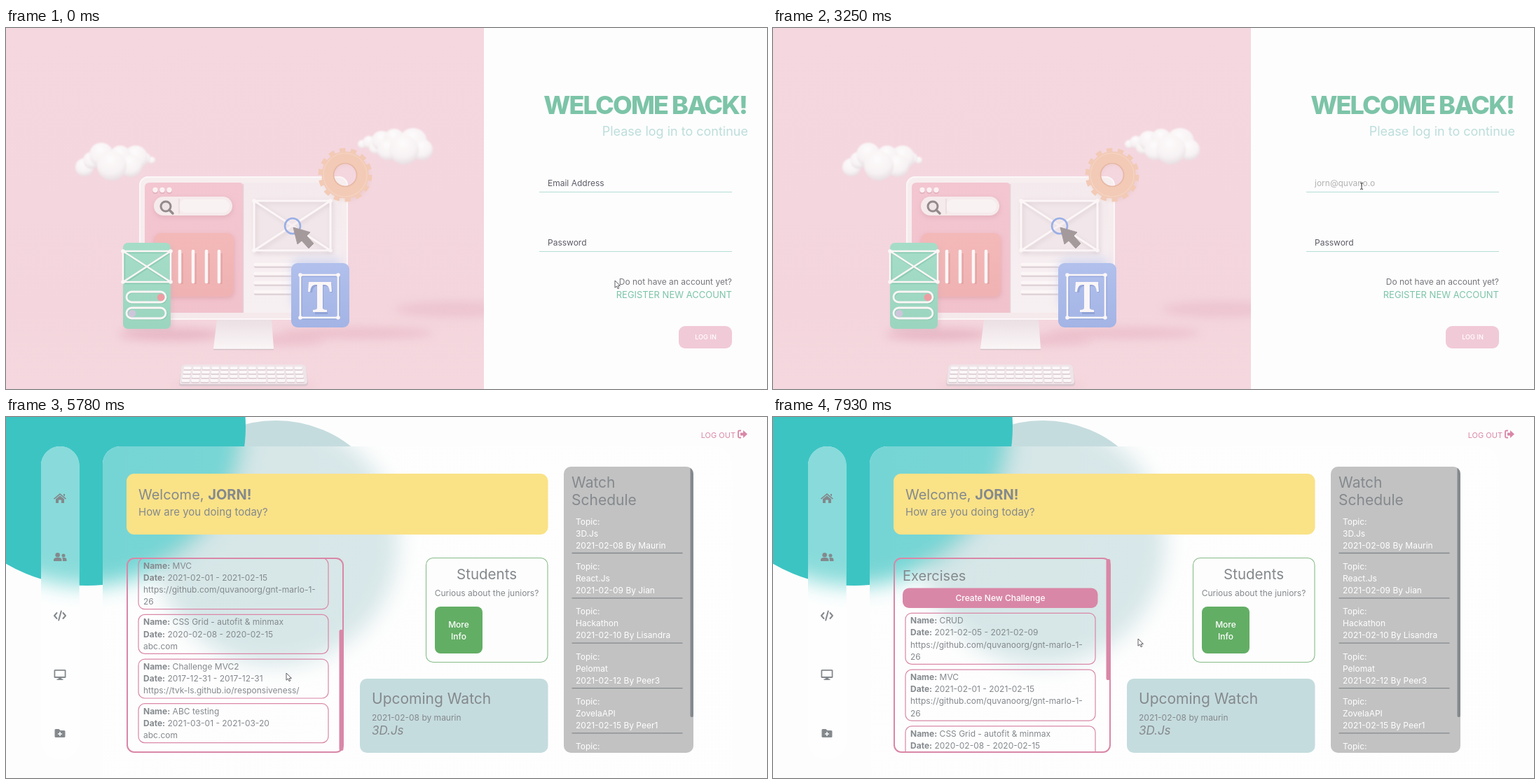
An HTML page that plays this animation: 1086 px wide and 516 px high, repeating every 8000 ms.

```html
<!DOCTYPE html>
<html lang="en">
<head>
<meta charset="utf-8">
<title>Log in and dashboard</title>
<style>
html, body { margin: 0; width: 100%; height: 100%; overflow: hidden; background: #fdfdfd; }
svg { display: block; width: 100%; height: 100%; }
text { font: 12px Inter, "Open Sans", sans-serif; fill: #84898d; white-space: pre; }
.b { font-weight: 700; }
.h { font-weight: 800; letter-spacing: -.052em; }
.m { font-weight: 500; }
.mid { text-anchor: middle; }
.end { text-anchor: end; }
.white { fill: #fff; }
.wire { fill: none; stroke: #fcf6f7; stroke-linecap: round; stroke-linejoin: round; }
</style>
</head>
<body>
<svg id="stage" viewBox="0 0 1086 516" xmlns="http://www.w3.org/2000/svg"></svg>
<script>
const PINK = '#d987a7', GREY = '#84898d', GREEN = '#7cc4a8', MINT = '#b5ddd6';

const rect = (x, y, x2, y2, r, fill, more = '') =>
  `<rect x="${x}" y="${y}" width="${x2 - x}" height="${y2 - y}" rx="${r}" fill="${fill}" ${more}/>`;
const circle = (x, y, r, fill, more = '') =>
  `<circle cx="${x}" cy="${y}" r="${r}" fill="${fill}" ${more}/>`;
const path = (d, fill, more = '') => `<path d="${d}" fill="${fill}" ${more}/>`;
const wire = (d, w) => `<path class="wire" d="${d}" stroke-width="${w}"/>`;
const text = (x, y, s, size = 12, cls = '', more = '') =>
  `<text x="${x}" y="${y}" class="${cls}" style="font-size:${size}px;${more}">${s}</text>`;
const bold = s => `<tspan class="b">${s}</tspan>`;
const grad = (id, a, b, dir = 'x2="0" y2="1"') =>
  `<linearGradient id="${id}" ${dir}><stop stop-color="${a}"/><stop offset="1" stop-color="${b}"/></linearGradient>`;

const defs = `<defs>
  <linearGradient id="wall" x2="0" y2="1">
    <stop stop-color="#f5d7e0"/><stop offset=".5" stop-color="#f4d6df"/>
    <stop offset=".78" stop-color="#f4d5dd"/><stop offset="1" stop-color="#f5d8df"/>
  </linearGradient>
  <radialGradient id="puff" cx=".45" cy=".28" r=".8">
    <stop stop-color="#fdfbfb"/><stop offset=".6" stop-color="#f7f2f3"/><stop offset="1" stop-color="#e2d8db"/>
  </radialGradient>
  ${grad('frame', '#f7eef0', '#f5e9ec')}
  ${grad('screen', '#f4eaed', '#f7f0f2')}
  ${grad('side', '#f3c6d1', '#f1c2cc')}
  ${grad('card', '#f3b9b8', '#f0b2b3')}
  ${grad('green', '#a5ddc8', '#9bd5bf')}
  ${grad('blue', '#b1c0ec', '#a3b4e5')}
  ${grad('stand', '#ebe0e4', '#fbf6f7')}
  ${grad('glass', '#ffffff46', '#ffffff62', '')}
  <filter id="soft" x="-30%" y="-120%" width="160%" height="340%"><feGaussianBlur stdDeviation="7"/></filter>
  <filter id="near" x="-20%" y="-20%" width="140%" height="140%"><feGaussianBlur stdDeviation="3"/></filter>
  <filter id="haze" x="-5%" y="-5%" width="110%" height="110%"><feGaussianBlur stdDeviation=".8"/></filter>
  <filter id="frost" x="-20%" y="-20%" width="140%" height="140%"><feGaussianBlur stdDeviation="15"/></filter>
  <clipPath id="art">${rect(0, 0, 682, 516, 0, '#000')}</clipPath>
  <clipPath id="panel">${rect(138, 42, 1036, 540, 25, '#000')}</clipPath>
  <clipPath id="bar">${rect(50, 42, 104.5, 490, 27, '#000')}</clipPath>
  <clipPath id="list">${rect(174, 203, 480, 478, 9, '#000')}</clipPath>
  <clipPath id="plan">${rect(796, 71, 981, 480, 10, '#000')}</clipPath>
</defs>`;

const cloud = puffs => `<g filter="url(#haze)">` +
  puffs.map(([x, y, r]) => circle(x, y, r, 'url(#puff)')).join('') + '</g>';

function gear() {
  const c = '#f2cab6';
  return circle(486, 214, 26, 'none', 'stroke="#dfb5a6" stroke-width="14" opacity=".3" filter="url(#near)"') +
    circle(484, 210, 34, 'none', `stroke="${c}" stroke-width="9" pathLength="28" stroke-dasharray="1.05 .95"`) +
    circle(484, 210, 25, 'none', `stroke="${c}" stroke-width="17"`) +
    circle(484, 210, 16.5, 'none', 'stroke="#e6b8a4" stroke-width="1.6"') +
    circle(484, 210, 31, 'none', 'stroke="#f5d3c1" stroke-width="1.5"');
}

function keyboard() {
  const cols = 13;
  let s = path('M255 481H423Q427 481 428 485L431 507Q431 512 426 512H251Q246 512 247 507L250 485Q251 481 255 481Z',
    '#d9c8cf') +
    path('M255 481H423Q427 481 428 485L430 505Q430 509 426 509H251Q247 509 248 505L250 485Q251 481 255 481Z', '#efe4e8');
  for (let row = 0; row < 4; row++) {
    const y = 484 + row * 6, x0 = 254 - row * 1.1, w = (171 + row * 2.2) / cols;
    for (let i = 0; i < cols; i++) {
      const span = row === 3 && i === 4 ? 5 : 1;
      const x = x0 + i * w, x2 = x + span * w - 2.5;
      s += rect(x, y + 1.4, x2, y + 5.2, 1.3, '#cdbcc3') + rect(x, y, x2, y + 4.2, 1.3, '#fbf7f8');
      i += span - 1;
    }
  }
  return s;
}

function artwork() {
  const corners = (x, y, x2, y2, r) =>
    [[x, y], [x2, y], [x, y2], [x2, y2]].map(p => circle(p[0], p[1], r, '#fcf6f7')).join('');
  const shade = (x, y, rx, ry, c, o) =>
    `<ellipse cx="${x}" cy="${y}" rx="${rx}" ry="${ry}" fill="${c}" opacity="${o}" filter="url(#soft)"/>`;
  const columns = [248, 267, 286, 304];
  return `<g clip-path="url(#art)">` +
    rect(0, 0, 682, 516, 0, 'url(#wall)') +
    shade(640, 402, 85, 11, '#e5b5c5', .5) + shade(500, 436, 110, 7, '#e2a9ba', .55) +
    shade(235, 438, 75, 8, '#dfa3b5', .65) + shade(385, 446, 70, 7, '#e3abbb', .55) +
    shade(340, 511, 105, 5, '#e6b3c1', .5) +
    cloud([[208, 189, 5], [198, 186, 8], [112, 199, 13], [122, 189, 12], [136, 181, 17],
      [185, 185, 17], [163, 183, 15], [178, 197, 16], [151, 197, 21]]) +
    cloud([[508, 166, 6], [518, 163, 9], [527, 171, 9], [536, 161, 14], [554, 158, 14],
      [581, 163, 20], [594, 174, 15], [545, 174, 15], [568, 174, 21]]) +
    rect(190, 212, 488, 417, 13, 'url(#frame)') +
    rect(191, 213, 487, 416, 12, 'none', 'stroke="#fcf6f7" stroke-width="2"') +
    rect(198, 221, 479, 407, 8, 'url(#screen)') +
    path('M205 221H333Q338 221 338 226V407H205Q198 407 198 400V228Q198 221 205 221Z', 'url(#side)') +
    path('M338.5 223V407', 'none', 'stroke="#e6cfd5" stroke-width="1.5"') +
    [213, 223, 233].map(x => circle(x, 233, 4, '#e0b0bb') + circle(x, 231.5, 3.7, '#fbf1f3')).join('') +
    rect(211, 243, 324, 271, 13, '#dba9b4', 'opacity=".6" filter="url(#near)"') +
    rect(211, 241, 323, 268, 13.5, '#f6ebec') +
    rect(247, 245, 319, 264, 9, '#f9f2f2') + path('M247 244V266', 'none', 'stroke="#e8d9dc" stroke-width="1.5"') +
    circle(228, 255, 7, '#efe4e6', 'stroke="#938a8c" stroke-width="3"') +
    path('M233 260L238 265', 'none', 'stroke="#938a8c" stroke-width="3.5" stroke-linecap="round"') +
    rect(211, 295, 326, 387, 9, '#d99ba3', 'opacity=".5" filter="url(#near)"') +
    rect(212, 293, 325, 384, 9, 'url(#card)') +
    columns.map(x => path(`M${x + 3} 322V366`, 'none', 'stroke="#dc9798" stroke-width="4" opacity=".5"') +
      wire(`M${x} 319V363`, 4.5)).join('') +
    rect(354, 247, 464, 320, 2, '#f1e7ea') +
    path('M356 249H465V321H356ZL465 321M465 249L356 321', 'none', 'stroke="#d9cbd0" stroke-width="3" filter="url(#near)"') +
    wire('M354 247H463V318H354ZL463 318M463 247L354 318', 3) + corners(354, 247, 463, 318, 2.8) +
    circle(409, 283, 11, '#f3eaee88', 'stroke="#99afe6" stroke-width="2.6"') +
    path('M410 285L434 292L429 297L439 308L432 315L422 304L416 309Z', '#a4999b',
      'stroke="#a4999b" stroke-width="1" stroke-linejoin="round"') +
    [338, 351, 364, 377].map(y => path(`M356 ${y + 3}H406`, 'none',
      'stroke="#e0d3d7" stroke-width="4" stroke-linecap="round"') + wire(`M356 ${y}H406`, 5)).join('') +
    wire('M406 338H424', 5) +
    gear() +
    path('M301 417H379L382 458Q382 460 380 460H298Q296 460 296 458Z', 'url(#stand)') +
    path('M296 459.5H382', 'none', 'stroke="#d3c1c8" stroke-width="1.5"') +
    rect(408, 329, 480, 400, 10, '#b5c4ee', 'opacity=".5" filter="url(#soft)"') +
    rect(407, 336, 490, 428, 9, 'url(#blue)') +
    path('M422 355H476V416H422Z', 'none', 'stroke="#8c9fd6" stroke-width="2" opacity=".5"') +
    wire('M420 353H474V414H420Z', 2.5) + corners(420, 353, 474, 414, 2.8) +
    path('M433 363H463L464 376H461Q460 367 454 367H451V400Q451 404 457 404V407H439V404Q444 404 444 400V367H442Q436 367 435 376H432Z',
      '#8296cd', 'transform="translate(2 2)" opacity=".6"') +
    path('M432 363H464L465 377H462Q461 367 455 367H452V400Q452 403 458 403V406H438V403Q444 403 444 400V367H441Q435 367 434 377H431Z', '#fbf6f7') +
    rect(170, 312, 238, 432, 7, '#c9a9b3', 'opacity=".3" filter="url(#near)"') +
    rect(167, 307, 235, 430, 7, 'url(#green)') +
    path('M169 321H235V365H169ZL235 365M235 321L169 365', 'none', 'stroke="#7cbfa6" stroke-width="2.5" opacity=".5"') +
    wire('M167 319H235V363H167ZL235 363M235 319L167 363', 2.5) + corners(167, 319, 235, 363, 2.8) +
    [377, 400].map(y => rect(173, y + 1, 229, y + 16, 8, 'none', 'stroke="#7cbfa6" stroke-width="3" opacity=".5"') +
      rect(172, y, 228, y + 15, 7.5, 'none', 'stroke="#fcf6f7" stroke-width="2.8"')).join('') +
    circle(221, 385, 5.3, '#ee9da3') + circle(180, 408, 5.3, '#cdc6da') +
    keyboard() + `</g>`;
}

function login() {
  const field = y => path(`M761 ${y}H1036`, 'none', `stroke="${MINT}" stroke-width="1.2"`);
  return artwork() +
    text(1057, 122.5, 'WELCOME BACK!', 36, 'h end', `fill:${GREEN}`) +
    text(1059, 154, 'Please log in to continue', 18, 'end', 'fill:#bcdedb') +
    `<g id="mail">${text(773, 226, 'Email Address', 12, '', 'fill:#5d5b66')}</g>` +
    text(773, 226, '', 12, 'typed', 'fill:#b2b2b4') +
    `<g id="pass">${text(773, 311, 'Password', 12, '', 'fill:#5d5b66')}</g>` +
    [0, 1, 2, 3].map(i => circle(775 + i * 4.9, 307, 1.7, '#b2b2b4', 'class="dot"')).join('') +
    field(234.5) + field(319.5) +
    text(1036, 367, 'Do not have an account yet?', 12, 'end', 'fill:#77757c') +
    text(1036, 386, 'REGISTER NEW ACCOUNT', 13, 'end link') +
    rect(960, 426, 1036, 458, 9, '#f1cad7') +
    text(998.5, 445, 'LOG IN', 9.2, 'm mid white');
}

const repo = ['https://github.com/quvanoorg/gnt-marlo-1-', '26'];
const tasks = [
  ['CRUD', '2021-02-05 - 2021-02-09', ...repo],
  ['MVC', '2021-02-01 - 2021-02-15', ...repo],
  ['CSS Grid - autofit &amp; minmax', '2020-02-08 - 2020-02-15', 'abc.com'],
  ['Challenge MVC2', '2017-12-31 - 2017-12-31', 'https://tvk-ls.github.io/responsiveness/'],
  ['ABC testing', '2021-03-01 - 2021-03-20', 'abc.com']
];
const talks = [
  ['3D.Js', '2021-02-08 By Maurin'], ['React.Js', '2021-02-09 By Jian'],
  ['Hackathon', '2021-02-10 By Lisandra'], ['Pelomat', '2021-02-12 By Peer3'],
  ['ZovelaAPI', '2021-02-15 By Peer1'], ['Testing', '2021-02-16 By Peer2']
];

function taskList() {
  let y = 280.3;
  return tasks.map(([name, date, ...url]) => {
    const h = 4.5 + 17.15 * (2 + url.length), top = y;
    y += h + 7.7;
    return rect(189, top, 460, top + h, 9, 'none', `stroke="${PINK}" stroke-width="1.2"`) +
      [`${bold('Name:')} ${name}`, `${bold('Date:')} ${date}`, ...url]
        .map((s, i) => text(196, top + 15 + i * 17.15, s)).join('');
  }).join('');
}

function icons() {
  const home = 'M77 109L86 116.5L85 117.7L77 111.2L69 117.7L68 116.5ZM82 110H84V113.5L82 112ZM77 112.5L83 117.3V123H79V118.5H75V123H71V117.3Z';
  const users = 'M68 206V204.5Q68 201 72 201H75.5Q79.5 201 79.5 204.5V206ZM81 206V204Q81 202.3 80 201H83Q86.5 201 86.5 204V206Z';
  const screen = 'M70 361H84Q85.5 361 85.5 362.5V371.5Q85.5 373 84 373H79L79.5 374.5H81.5V376H72.5V374.5H74.5L75 373H70Q68.5 373 68.5 371.5V362.5Q68.5 361 70 361ZM70.3 362.8V371H83.7V362.8Z';
  const folder = 'M71 446H75.5L77.5 448H83Q84.5 448 84.5 449.5V456.5Q84.5 458 83 458H71Q69.5 458 69.5 456.5V447.5Q69.5 446 71 446Z';
  return path(home, GREY) + path(users, GREY) + circle(73.7, 197.3, 3.3, GREY) + circle(82, 198, 2.5, GREY) +
    path('M72.5 280L69 284L72.5 288M81.5 280L85 284L81.5 288M78.8 277.5L75.2 290.5', 'none',
      `stroke="${GREY}" stroke-width="2" stroke-linecap="round" stroke-linejoin="round"`) +
    path(screen, GREY, 'fill-rule="evenodd"') + path(folder, GREY) +
    path('M77 450V456M74 453H80', 'none', 'stroke="#fdfdfd" stroke-width="1.5"');
}

function dashboard() {
  const discs = circle(385, 180, 175, '#c5dcde') + circle(115, 14, 227, '#3cc4c3');
  const frosted = clip => `<g clip-path="url(#${clip})">${rect(0, 0, 1086, 560, 0, '#fdfdfd')}` +
    `<g filter="url(#frost)">${discs}</g>${rect(0, 0, 1086, 560, 0, clip === 'bar' ? '#ffffff62' : 'url(#glass)')}</g>`;
  return rect(0, 0, 1086, 516, 0, '#fdfdfd') + discs + frosted('panel') + frosted('bar') + icons() +
    text(1041, 30, 'LOG OUT', 11, 'end', `fill:${PINK}`) +
    path('M1049 19.5H1046.5Q1045 19.5 1045 21V28Q1045 29.5 1046.5 29.5H1049', 'none', `stroke="${PINK}" stroke-width="1.8"`) +
    path('M1048 22.5H1052V19L1058 24.5L1052 30V26.5H1048Z', PINK) +

    rect(172, 81, 773.5, 168, 11, '#fae287') +
    text(189, 117.5, `Welcome, ${bold('JORN!')}`, 20) +
    text(189, 141, 'How are you doing today?', 15) +

    `<g clip-path="url(#list)"><g id="tasks">` +
    text(185, 234, 'Exercises', 20) + rect(185, 244.5, 463.5, 273, 9, PINK) +
    text(324.5, 263, 'Create New Challenge', 12, 'm mid white') + taskList() + `</g></g>` +
    rect(173, 202, 481, 479, 10, 'none', `stroke="${PINK}" stroke-width="2"`) +
    rect(475.5, 203, 481.5, 376, 2.5, PINK, 'id="taskThumb"') +

    rect(599.5, 201.5, 773, 350.5, 10, '#fdfdfd', 'stroke="#86bd88" stroke-width="1.1"') +
    text(686, 232, 'Students', 20.5, 'mid') + text(686, 255.5, 'Curious about the juniors?', 12, 'mid') +
    rect(612, 271, 680, 338, 8, '#63ae65') +
    text(646, 301, 'More', 12, 'm mid white') + text(646, 318, 'Info', 12, 'm mid white') +

    rect(505, 374, 773.5, 480, 10, '#c5dcde') +
    text(522, 410, 'Upcoming Watch', 21) + text(522, 433.5, '2021-02-08 by maurin') +
    text(522, 454, '3D.Js', 17, '', 'font-style:italic') +

    `<g clip-path="url(#plan)">${rect(796, 71, 981, 480, 0, '#c2c2c2')}<g id="talks">` +
    text(807, 101, 'Watch', 21) + text(807, 125.5, 'Schedule', 21) +
    talks.map((talk, i) => ['Topic:', ...talk]
      .map((s, j) => text(813, 153.5 + i * 64.35 + j * 17.1, s, 12, 'white')).join('') +
      path(`M807.5 ${194.5 + i * 64.35}H965.5`, 'none', 'stroke="#84898d" stroke-width="1.3"')).join('') +
    `</g>${rect(976.5, 71, 981, 429, 2, GREY, 'id="talkThumb"')}</g>`;
}

const stage = document.getElementById('stage');
stage.innerHTML = defs + `<g id="login">${login()}</g><g id="home">${dashboard()}</g><g id="pointer">` +
  path('M0 0V10.2L2.4 8L4.1 11.7L5.8 10.9L4.2 7.4H7.4Z', '#fff', 'id="arrow" stroke="#4c4c52" stroke-width=".9"') +
  path('M-2 -4.5Q0 -4.5 0 -3.5Q0 -4.5 2 -4.5M0 -3.5V3.5M-2 4.5Q0 4.5 0 3.5Q0 4.5 2 4.5', 'none',
    'id="beam" stroke="#333" stroke-width="1"') + '</g>';

const $ = s => stage.querySelector(s);
const show = (el, on) => el.setAttribute('display', on ? 'inline' : 'none');
const shift = (el, x, y) => el.setAttribute('transform', `translate(${x} ${y})`);
const loginView = $('#login'), home = $('#home'), mail = $('#mail'), pass = $('#pass'),
  typed = $('.typed'), dots = [...stage.querySelectorAll('.dot')], link = $('.link'),
  taskBox = $('#tasks'), taskThumb = $('#taskThumb'), talkBox = $('#talks'), talkThumb = $('#talkThumb'),
  pointer = $('#pointer'), arrow = $('#arrow'), beam = $('#beam');

const LOOP = 8000, SWITCH = 4650, EMAIL = 'jorn@quvano.org';
const clamp = v => Math.min(1, Math.max(0, v));
const ease = (t, a, b) => { const k = clamp((t - a) / (b - a)); return k * k * (3 - 2 * k); };

// Pointer stops: time, x, y
const stops = [
  [0, 869, 361], [100, 869, 361], [350, 905, 389], [620, 945, 250], [900, 960, 380], [1000, 960, 380],
  [1350, 900, 392], [1800, 930, 259], [1900, 930, 259], [2250, 840, 226], [3650, 840, 226],
  [4270, 1042, 456], [4480, 1005, 442], [4720, 1005, 442], [5120, 490, 350], [5320, 400, 366],
  [6400, 400, 366], [6830, 660, 405], [6930, 686, 418], [7030, 686, 418], [7250, 880, 300],
  [7550, 880, 300], [7730, 655, 333], [7830, 600, 326], [7930, 521, 317], [LOOP, 521, 317]
];
function pointerAt(t) {
  const i = Math.max(1, stops.findIndex(s => s[0] > t));
  const [t0, x0, y0] = stops[i - 1], [t1, x1, y1] = stops[i], k = ease(t, t0, t1);
  return [x0 + (x1 - x0) * k, y0 + (y1 - y0) * k];
}

function draw(t) {
  const out = t < SWITCH, [x, y] = pointerAt(t);
  show(loginView, out);
  show(home, !out);

  const letters = Math.floor(clamp((t - 2500) / 825) * EMAIL.length);
  const marks = Math.floor((t - 3330) / 70);
  show(mail, letters === 0);
  typed.textContent = EMAIL.slice(0, letters);
  show(pass, marks < 1);
  dots.forEach((d, i) => show(d, i < marks));
  link.style.fill = x > 868 && x < 1036 && y > 373 && y < 391 ? PINK : GREEN;

  const down = ease(t, 5460, 5760) - ease(t, 6080, 6380);
  shift(taskBox, 0, -159.5 * down);
  shift(taskThumb, 0, 101 * down);
  const side = ease(t, 7230, 7380) - ease(t, 7430, 7600);
  shift(talkBox, 0, -57 * side);
  shift(talkThumb, 0, 50 * side);

  const overField = out && x > 761 && x < 1036 && (y > 201 && y < 235 || y > 286 && y < 320);
  show(arrow, !overField);
  show(beam, overField);
  shift(pointer, x, y);
}

const start = performance.now();
function tick() {
  draw((performance.now() - start) % LOOP);
  requestAnimationFrame(tick);
}
tick();
</script>
</body>
</html>
```
